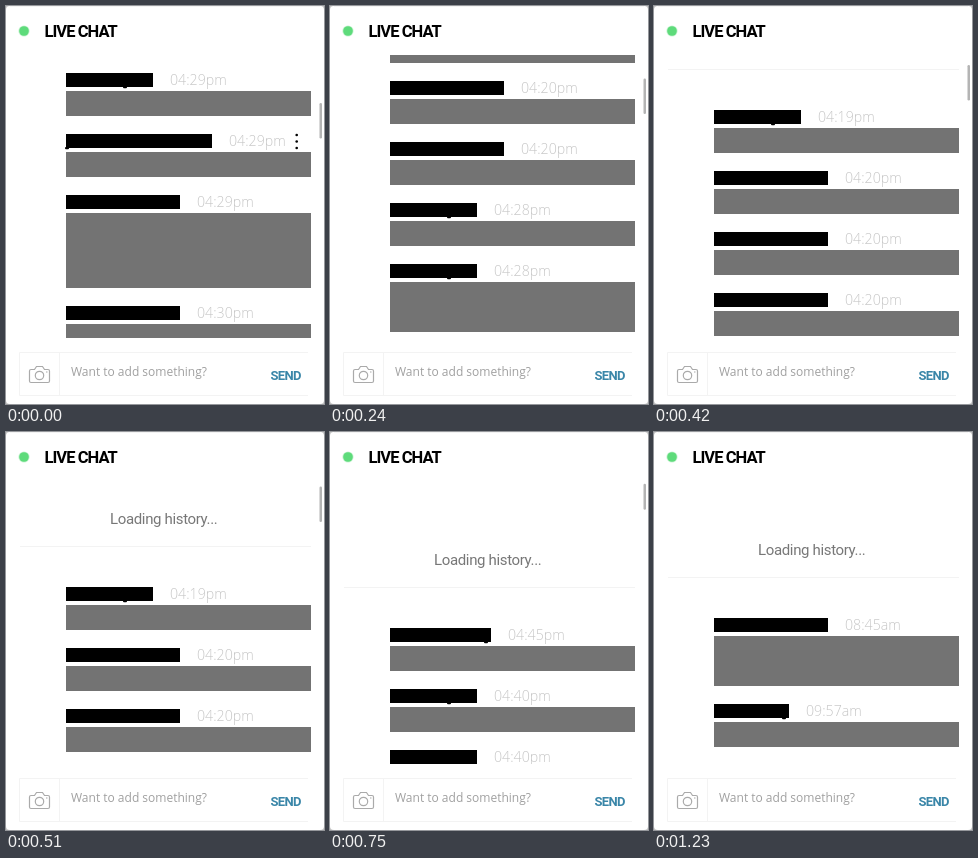
Write an HTML page that moves like this. It is 318 by 398 pixels and loops after 2010 ms.

```html
<!DOCTYPE html>
<html lang="en">
<head>
<meta charset="utf-8">
<title>Live chat</title>
<style>
  html, body { margin: 0; width: 100%; height: 100%; overflow: hidden; background: #c4c4c4; }
  svg { display: block; width: 318px; height: 398px; }
  text { white-space: pre; }
  .title { font: 700 16.5px Roboto, sans-serif; letter-spacing: -.95px; }
  .loading { font: 400 15px Roboto, sans-serif; letter-spacing: -.35px; fill: #777; }
  .time { font: 300 14.2px "Open Sans", sans-serif; fill: #c6c6c6; }
  .hint { font: 400 12px "Open Sans", sans-serif; fill: #a0a0a0; }
  .send { font: 700 13px Roboto, sans-serif; letter-spacing: -.7px; fill: #3a86a8; }
  .rule { stroke: #f3f3f3; fill: none; }
  .box { fill: #737373; }
</style>
</head>
<body>
<svg viewBox="0 0 318 398">
  <clipPath id="view"><rect y="49" width="318" height="283"/></clipPath>
  <rect width="318" height="398" rx="4" fill="#fff"/>
  <path class="rule" d="M4 .5H314"/>

  <g clip-path="url(#view)">
    <g id="list">
      <text class="loading" x="104" y="-387">Loading history...</text>
      <path class="rule" d="M14 -364.5H305"/>
    </g>
  </g>
  <rect id="thumb" x="313.5" width="2.5" rx="1.25" fill="#b4b4b4"/>

  <circle cx="18" cy="25" r="5.6" fill="#c9f3d3"/>
  <circle cx="18" cy="25" r="4.8" fill="#5edb7b"/>
  <text class="title" x="38.5" y="31">LIVE CHAT</text>

  <path class="rule" d="M13.5 346.5H302M13.5 389.5H302M13.5 346.5V389.5M53.5 346.5V389.5"/>
  <g fill="none" stroke="#aaa" stroke-width="1.2">
    <path d="M25 363.5H28.5L30.5 360.5H36.5L38.5 363.5H42Q43.5 363.5 43.5 365V375Q43.5 376.5 42 376.5H25Q23.5 376.5 23.5 375V365Q23.5 363.5 25 363.5Z"/>
    <circle cx="33.5" cy="369.5" r="4.2"/>
    <path d="M40 366H41.5"/>
  </g>
  <text class="hint" x="65" y="370">Want to add something?</text>
  <text class="send" x="264.5" y="374">SEND</text>
</svg>
<script>
const LOOP = 2010, STEP = 30, TOP = 510, FIRST_Y = -324;
const list = document.getElementById('list');
const thumb = document.getElementById('thumb');

// Each message: width of the blacked-out name, time, body height
const pages = [
  { from: 0, items: [
    [87, '04:19pm', 25], [114, '04:20pm', 25], [114, '04:20pm', 25], [114, '04:20pm', 25],
    [87, '04:28pm', 25], [87, '04:28pm', 50], [87, '04:29pm', 25], [146, '04:29pm', 25],
    [114, '04:29pm', 75], [114, '04:30pm', 25]] },
  { from: 630, items: [[101, '04:45pm', 25], [87, '04:40pm', 25], [87, '04:40pm', 25]] },
  { from: 870, items: [[114, '08:45am', 50], [75, '09:57am', 25]] }
];
// Where a letter's tail sticks out below a name bar
const tails = { 87: 57, 101: 94, 75: 68, 146: -1 };

// Scroll distance over time, with the bounce past the top
const path = [[0, 0], [150, 178], [330, 364], [510, 479], [600, 510], [670, 523],
  [750, 520], [850, 513], [960, 511], [1080, 510], [LOOP, 510]];

function add(parent, tag, attrs, text) {
  const el = document.createElementNS('http://www.w3.org/2000/svg', tag);
  for (const key in attrs) el.setAttribute(key, attrs[key]);
  if (text) el.textContent = text;
  return parent.appendChild(el);
}

function addMessage(page, y, [width, time, height]) {
  add(page, 'rect', { x: 60, y, width, height: 14 });
  if (width in tails) {
    add(page, 'rect', { x: 60 + tails[width], y: y + 13, width: 4, height: 2.2, rx: 1 });
  }
  add(page, 'text', { class: 'time', x: 77 + width, y: y + 12 }, time);
  add(page, 'rect', { class: 'box', x: 60, y: y + 18, width: 245, height });
  if (width === 146) {
    for (const dy of [1, 7.5, 14]) add(page, 'circle', { cx: 290.7, cy: y + dy, r: 1.3 });
  }
}

for (const page of pages) {
  page.el = add(list, 'g', {});
  let y = FIRST_Y;
  for (const item of page.items) {
    addMessage(page.el, y, item);
    y += item[2] + 36;
  }
}

function slope(i) {
  const a = path[Math.max(i - 1, 0)], b = path[Math.min(i + 1, path.length - 1)];
  return (b[1] - a[1]) / (b[0] - a[0]);
}

function scrollAt(t) {
  let i = 0;
  while (i < path.length - 2 && t >= path[i + 1][0]) i++;
  const [t0, s0] = path[i], [t1, s1] = path[i + 1];
  const d = t1 - t0, u = (t - t0) / d, v = 1 - u;
  return s0 * v * v * (1 + 2 * u) + s1 * u * u * (3 - 2 * u)
    + d * u * v * (slope(i) * v - slope(i + 1) * u);
}

function draw(now) {
  const t = Math.floor((now % LOOP) / STEP) * STEP;
  const s = Math.round(scrollAt(t));
  list.setAttribute('transform', `translate(0 ${s})`);

  const current = pages.filter(p => t >= p.from).pop();
  for (const p of pages) p.el.style.display = p === current ? '' : 'none';

  thumb.setAttribute('y', 97 - Math.min(s, TOP) * 0.0885);
  thumb.setAttribute('height', 35.5 - Math.max(s - TOP, 0) * 0.95);
  thumb.setAttribute('opacity', Math.max(0, Math.min(1, (1230 - t) / 150)));
}

function tick() {
  draw(performance.now());
  requestAnimationFrame(tick);
}
tick();
</script>
</body>
</html>
```
